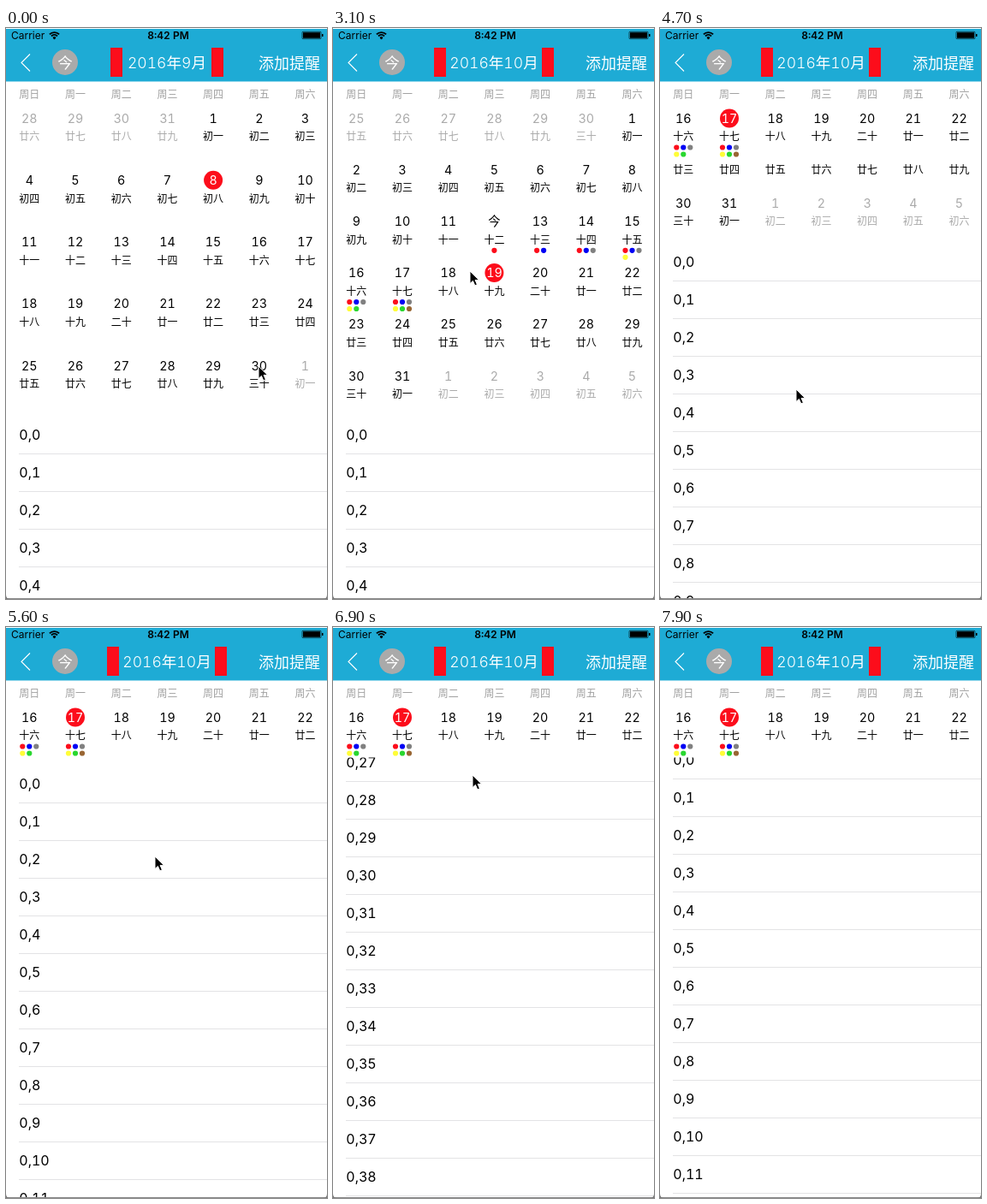
Animation of 375x667 px, one loop 8 s. Source, as an HTML page:

```html
<!DOCTYPE html>
<html lang="zh">
<head>
<meta charset="utf-8">
<title>Calendar</title>
<style>
  html, body { margin: 0; width: 100%; height: 100%; overflow: hidden; background: #fff; }
  svg { display: block; position: fixed; left: 0; top: 0; }
  text {
    font-family: Inter, "Noto Sans CJK SC", "Noto Sans CJK", sans-serif;
    font-variant-numeric: tabular-nums;
  }
  .mid { text-anchor: middle; }
  .day { font-size: 14.3px; }
  .small { font-size: 12px; }
  .item { font-size: 16px; }
  .bold { font-weight: 600; }
  .light { font-weight: 300; }
  .title { font-size: 17.6px; }
  .action { font-size: 18px; }
</style>
</head>
<body>
<svg id="stage" width="375" height="667" viewBox="0 0 375 667"></svg>
<script>
const LOOP = 8000, STEP = 100;
const RED = '#fc0d1b', GRAY = '#aaa', BLUE = '#1eabd5';
const ROW = 44, LIST_TOP = 453.5, PIN_Y = 105.5, PIN_BOTTOM = 152.5, FULL = 300;
const DOTS = [RED, '#0000f5', '#808080', '#fffd38', '#29d72f', '#996633'];
const stage = document.getElementById('stage');

function el(parent, tag, attrs = {}, content) {
  const node = document.createElementNS('http://www.w3.org/2000/svg', tag);
  for (const key in attrs) node.setAttribute(key, attrs[key]);
  if (content !== undefined) node.textContent = content;
  return parent.appendChild(node);
}
const group = parent => el(parent, 'g');
const rect = (parent, x, y, width, height, fill) => el(parent, 'rect', { x, y, width, height, fill });
const label = (parent, x, y, cls, content, fill = '#000') =>
  el(parent, 'text', { x, y, class: cls, fill }, content);
const circle = (parent, cx, cy, r, fill) => el(parent, 'circle', { cx, cy, r, fill });
const line = (d, stroke, width) => el(stage, 'path', { d, fill: 'none', stroke, 'stroke-width': width });
const move = (node, x, y) => node.setAttribute('transform', `translate(${x} ${y})`);
const show = (node, on) => node.setAttribute('visibility', on ? 'visible' : 'hidden');
const colX = i => 27.3 + 53.7 * (i % 7);

function lunarName(n) {
  if (n === 20) return '二十';
  if (n === 30) return '三十';
  return '初十廿'[Math.floor((n - (n % 10 ? 0 : 1)) / 10)] + '十一二三四五六七八九'[n % 10];
}

function drawCell(parent, x, y, cell) {
  const fill = cell.inside ? '#000' : GRAY;
  label(parent, x, y + 5.2, 'day mid', cell.name, fill);
  label(parent, x, y + 25.8, 'small mid', cell.lunar, fill);
  const left = x - 4 * (Math.min(cell.dots, 3) - 1);
  for (let i = 0; i < cell.dots; i++)
    circle(parent, left + 8 * (i % 3), y + 34 + 8 * Math.floor(i / 3), 3.1, DOTS[i]);
}

function drawMark(parent, x, y, day) {
  const mark = group(parent);
  circle(mark, x, y, 11, RED);
  label(mark, x, y + 5.2, 'day mid', day, '#fff');
  return mark;
}

function monthCells(weeks, lead, prevDays, days, lunarOf, eventful) {
  return Array.from({ length: weeks * 7 }, (_, i) => {
    const n = i - lead + 1;
    const inside = n >= 1 && n <= days;
    const day = n < 1 ? prevDays + n : inside ? n : n - days;
    const event = eventful && inside && n >= 12 && n <= 17;
    return { inside, name: eventful && n === 12 ? '今' : day,
             lunar: lunarName(lunarOf(i)), dots: event ? n - 11 : 0 };
  });
}

const sepCells = monthCells(5, 4, 31, 30, i => i < 4 ? 26 + i : (i - 4) % 30 + 1, false);
const octCells = monthCells(6, 6, 30, 31, i => (24 + i) % 30 + 1, true);

rect(stage, 0, 0, 375, 667, '#fff');

// Month pages
function drawMonth(cells, lead, marked) {
  const page = group(stage), pitch = 361 / (cells.length / 7);
  const rowY = i => PIN_Y + pitch * Math.floor(i / 7);
  cells.forEach((cell, i) => drawCell(page, colX(i), rowY(i), cell));
  const marks = {};
  for (const day of marked) {
    const i = day + lead - 1;
    marks[day] = drawMark(page, colX(i), rowY(i), day);
  }
  return { page, marks };
}
const sep = drawMonth(sepCells, 4, [8]);
const oct = drawMonth(octCells, 6, [1, 19, 17]);

// Pinned week
const pinned = group(stage);
rect(pinned, 0, 62, 375, PIN_BOTTOM - 62, '#fff');
octCells.slice(21, 28).forEach((cell, i) => drawCell(pinned, colX(i), PIN_Y, cell));
drawMark(pinned, colX(1), PIN_Y, 17);

// List, with a pool of rows reused while scrolling
const clip = el(el(stage, 'defs'), 'clipPath', { id: 'below' });
rect(clip, 0, PIN_BOTTOM, 375, 667 - PIN_BOTTOM, '#000');
const list = el(stage, 'g', { 'clip-path': 'url(#below)' });
const rows = Array.from({ length: 14 }, () => {
  const row = group(list);
  rect(row, 0, 0, 375, ROW, '#fff');
  const text = label(row, 15.3, 27.7, 'item', '');
  rect(row, 15, ROW - 0.5, 360, 1, '#c8c7cc');
  return { row, text };
});

// Weekdays and navigation bar
rect(stage, 0, 62, 375, 29, '#fff');
[...'日一二三四五六'].forEach((c, i) => label(stage, colX(i), 82, 'small mid', '周' + c, '#a0a0a0'));
rect(stage, 0, 1, 375, 61.5, BLUE);
rect(stage, 0, 0, 375, 1, '#fff');
label(stage, 6, 13, 'small', 'Carrier');
for (const r of [2, 5, 8]) {
  const d = r * 0.7;
  line(`M${56.5 - d} ${13 - d}A${r} ${r} 0 0 1 ${56.5 + d} ${13 - d}`, '#000', 1.9);
}
circle(stage, 56.5, 12, 1.2, '#000');
label(stage, 189.5, 13, 'small mid bold', '8:42 PM');
line('M347 4.3H367Q368 4.3 368 5.3V11.7Q368 12.7 367 12.7H347Q346 12.7 346 11.7V5.3Q346 4.3 347 4.3Z', '#000', 0.6);
rect(stage, 347, 5.2, 20, 6.6, '#000');
rect(stage, 369, 7, 1.5, 3, '#000');
line('M28 30.5L18 40.5L28 50.5', '#fff', 1.1);
circle(stage, 69, 40, 15, GRAY);
label(stage, 69, 46.5, 'mid light title', '今', '#fff');
const title = label(stage, 188, 47, 'mid light title', '', '#fff');
const bars = [0, 1].map(() => rect(stage, 0, 23, 14, 34, RED));
label(stage, 295, 47.5, 'light action', '添加提醒', '#fff');

// Window edge
rect(stage, 0, 666, 375, 1, '#888');
el(stage, 'path', { d: 'M0 662Q0 667 5 667H0Z M375 662Q375 667 370 667H375Z', fill: '#777' });

const cursor = el(stage, 'path', {
  d: 'M0 0V14.5L3.4 11.4L5.8 16.8L8.4 15.7L6.1 10.4H10.6Z',
  fill: '#000', stroke: '#fff', 'stroke-width': 1, 'stroke-linejoin': 'round'
});

// Tables of [time, values...]
const pointer = [
  [0, 295, 395], [400, 351, 395], [1200, 351, 395], [2100, 188, 288], [2700, 188, 288],
  [3100, 160, 284], [3500, 80, 289], [3700, 80, 289], [4200, 155, 560], [4700, 159, 422],
  [5200, 172, 300], [5600, 174, 268], [5900, 170, 190], [6200, 168, 520], [6600, 163, 173],
  [7000, 163, 173], [7500, 170, 560], [7800, 172, 690], [8000, 172, 690]
];
const slide = [[500, 0], [900, 375]];
const fold = [[4200, 0], [4700, 202], [5200, 270], [5600, 292], [5800, FULL]];
const scroll = [
  [5800, 0], [6000, 190], [6300, 430], [6500, 680], [6700, 1010], [6900, 1205],
  [7100, 1250], [7300, 1000], [7500, 520], [7700, 170], [7900, 20]
];
const smooth = p => p * p * (3 - 2 * p);
const linear = p => p;

function at(track, t, ease = linear) {
  if (t <= track[0][0]) return track[0].slice(1);
  const k = track.findIndex(key => key[0] > t);
  if (k < 0) return track[track.length - 1].slice(1);
  const a = track[k - 1], b = track[k];
  const p = ease((t - a[0]) / (b[0] - a[0]));
  return a.slice(1).map((v, i) => v + (b[i + 1] - v) * p);
}

function render(t) {
  const [dx] = at(slide, t, smooth), [up] = at(fold, t), [offset] = at(scroll, t);
  move(sep.page, -dx, 0);
  move(oct.page, 375 - dx, -up);
  const selected = t < 2300 ? 1 : t < 3600 ? 19 : 17;
  for (const day in oct.marks) show(oct.marks[day], +day === selected);
  show(pinned, up > 180.5);

  const october = dx > 187;
  title.textContent = october ? '2016年10月' : '2016年9月';
  const half = october ? 70 : 66;
  bars[0].setAttribute('x', 188 - half);
  bars[1].setAttribute('x', 188 + half - 14);

  const first = Math.floor(offset / ROW);
  rows.forEach(({ row, text }, i) => {
    move(row, 0, LIST_TOP - up + (first + i) * ROW - offset);
    text.textContent = '0,' + (first + i);
  });
  move(cursor, ...at(pointer, t, smooth));
}

let start;
function tick(now) {
  start ??= now;
  render(Math.floor((now - start) % LOOP / STEP) * STEP);
  requestAnimationFrame(tick);
}
render(0);
requestAnimationFrame(tick);
</script>
</body>
</html>
```
